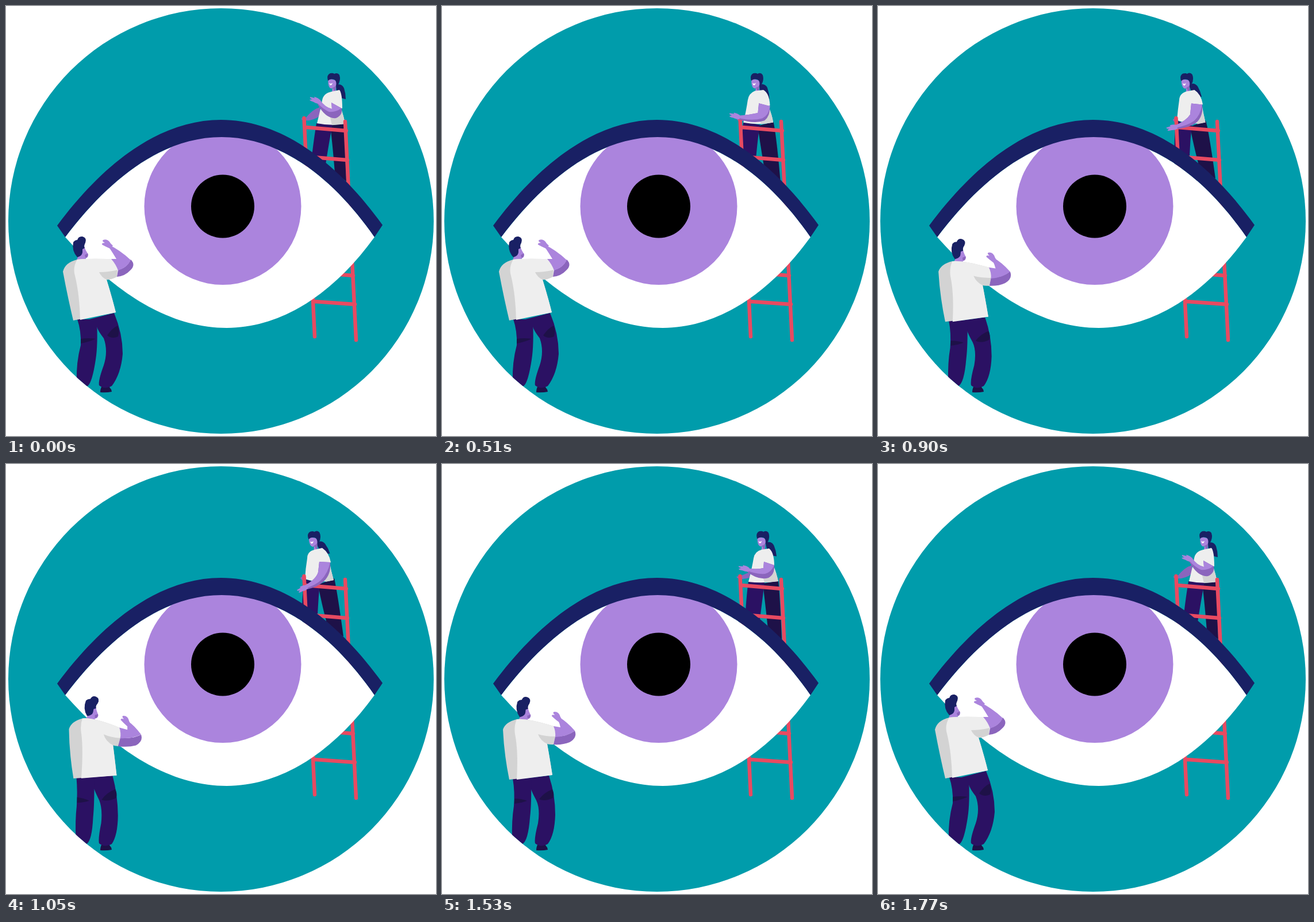
An HTML page that plays this animation: 748 by 748 pixels, repeating every 2.27 s.

```html
<!DOCTYPE html>
<html lang="en">
<head>
<meta charset="utf-8">
<title>Eye check</title>
<style>
  html, body { margin: 0; height: 100%; overflow: hidden; background: #fff; }
  svg { display: block; width: 100vw; height: 100vh; }
</style>
</head>
<body>
<svg viewBox="0 0 748 748">
  <clipPath id="disc"><circle cx="374" cy="374" r="370"/></clipPath>
  <circle cx="374" cy="374" r="370" fill="#009cab"/>

  <g id="womanBack"></g>
  <path d="M518.5 195L537 575M590 201L609 581M522 211L592 217M522 262L594 268M532 463L604 469M537 514L607 519"
    stroke="#e84a61" stroke-width="6.5" stroke-linecap="round"/>
  <g id="womanFront"></g>

  <path d="M103 402C180 300 272 228 375 228S570 300 641 402C570 500 480 560 384 560C285 560 190 500 103 402Z" fill="#fff"/>
  <circle cx="377" cy="348.5" r="136.5" fill="#ab84dd"/>
  <circle cx="377" cy="348.5" r="55"/>
  <path d="M89 382C172 270 270 198 374 198S575 270 655 381L641 402C570 300 478 228 375 228S180 300 103 402Z" fill="#192064"/>

  <g id="man" clip-path="url(#disc)"></g>
</svg>
<script>
const SKIN = '#ab84dd', SHADE = '#8b65bd', NAVY = '#192064', PANTS = '#2b1163', DARK = '#1e1148',
      SHIRT = '#eee', GREY = '#d3d3d3';
const STEP = 30, LOOP = 2270, LAST = 18;
const NUMBER = /-?\d+(\.\d+)?/g;
const movers = [];

// Each phase maps steps to poses as [step, pose] pairs.
const phaseStarts = [150, 690, 1230];
const womanPhases = [[[0, 0], [7, 1], [18, 2]], [[0, 2], [12, 3]], [[2, 4], [10, 5], [18, 0]]];
const manPhases = [[[0, 0]], [[0, 0], [8, 1], [16, 2]], [[2, 2], [10, 1], [18, 0]]];

function add(parent, tag, attrs) {
  const el = document.createElementNS('http://www.w3.org/2000/svg', tag);
  for (const name in attrs) el.setAttribute(name, attrs[name]);
  return parent.appendChild(el);
}

function track(el, attr, phases, poses) {
  movers.push({ el, attr, phases, template: poses[0], poses: poses.map(p => p.match(NUMBER).map(Number)) });
}

const morph = (layer, phases, fill, ...poses) => track(add(layer, 'path', { fill }), 'd', phases, poses);

function rigid(layer, phases, shapes, ...poses) {
  const group = add(layer, 'g');
  for (const [fill, d] of shapes) add(group, 'path', { fill, d });
  track(group, 'transform', phases, poses);
}

function buildWoman(back, front) {
  const part = (...args) => morph(back, womanPhases, ...args);
  const arm = (...args) => morph(front, womanPhases, ...args);

  // far arm
  part(SHADE,
    'M546 176Q533 180 522 194L513 196Q516 200 528 199Q542 196 546 190Z',
    'M533 188Q525 192 520 194L512 196Q514 200 522 200Q528 198 531 198Z',
    'M523 192Q520 193 518 194L514 197Q514 201 519 201Q522 200 523 200Z',
    'M521 195Q518 195 516 195L512 198Q513 202 517 202Q519 201 521 200Z',
    'M523 194Q519 194 516 194L511 197Q513 201 517 201Q520 200 523 199Z',
    'M536 188Q528 191 521 194L512 196Q514 201 524 200Q531 199 535 198Z');
  // legs
  part(DARK,
    'M564 208L588 204Q589 220 592 305L572 290Q568 240 564 208Z',
    'M555 208L582 203Q586 230 590 305L564 285Q559 240 555 208Z',
    'M543 210L569 200Q575 215 587 300L560 285Q547 235 543 210Z',
    'M543 210L571 199Q576 220 587 300L560 285Q547 235 543 210Z',
    'M546 210L573 201Q578 220 588 302L562 285Q550 235 546 210Z',
    'M558 208L585 203Q588 230 591 305L567 287Q562 240 558 208Z');
  part(PANTS,
    'M540 204L568 206Q564 225 556 275L532 262Q535 235 540 204Z',
    'M530 204L559 206Q555 230 550 268L526 255Q527 225 530 204Z',
    'M519 198L546 208Q542 235 542 265L516 248Q516 215 519 198Z',
    'M519 200L546 208Q543 235 542 265L515 248Q516 220 519 200Z',
    'M522 201L550 208Q546 235 546 266L520 250Q521 220 522 201Z',
    'M533 204L561 206Q558 230 553 270L528 257Q530 225 533 204Z');
  // ponytail and head
  rigid(back, womanPhases, [[NAVY, 'M574 137Q584 134 588 143Q591 152 591 162Q583 161 579 157Q574 148 574 137Z']],
    'translate(0 0) rotate(0 574 138)', 'translate(-13.5 0) rotate(0 574 138)',
    'translate(-31 0) rotate(-5 574 138)', 'translate(-34 0) rotate(-18 574 138)',
    'translate(-30.5 0) rotate(-17 574 138)', 'translate(-11 0) rotate(-5 574 138)');
  rigid(back, womanPhases, [
    [SKIN, 'M561 126Q559 136 563 142Q567 145 568 142L567 150L573 151L574 139Q578 136 576 130Z'],
    [SHADE, 'M568 142Q572 141 574 138L573 150L571 148Z'],
    [NAVY, 'M560 130Q557 120 564 117Q569 116 571 118Q577 115 580 120Q583 129 577 138L574 139Q576 131 571 128Q564 126 560 130Z'],
    ['#fff', 'M562 134Q565 136 568 134Q567 138 564 138Z']],
    'translate(0 0) rotate(0 570 145)', 'translate(-13.5 0) rotate(0 570 145)',
    'translate(-31 0) rotate(-1 570 145)', 'translate(-32 0) rotate(-6 570 145)',
    'translate(-29 0) rotate(-5 570 145)', 'translate(-11.5 0) rotate(-1 570 145)');
  // shirt
  part(SHIRT,
    'M566 149Q552 152 550 164Q547 180 541 204Q565 209 590 205Q587 190 583 178L585 178Q585 152 580 146Z',
    'M552 148Q541 152 539 164Q536 182 530 205Q556 208 582 203Q580 190 573 176L576 175Q576 152 567 146Z',
    'M537 148Q525 152 524 163Q522 180 520 197Q545 208 569 203Q567 190 564 172L565 171Q562 152 551 146Z',
    'M537 149Q524 152 524 164Q521 182 520 200Q545 208 570 202Q566 188 563 172L565 171Q562 154 550 146Z',
    'M541 149Q528 152 527 163Q524 182 522 201Q548 209 572 203Q568 190 566 173L568 172Q565 153 553 146Z',
    'M556 149Q544 152 542 164Q539 182 533 205Q558 208 585 204Q582 190 577 177L578 177Q578 154 569 147Z');
  part(GREY,
    'M563 190L567 207L590 205Q588 193 584 184Z',
    'M555 195L558 206L582 203Q580 190 575 182Z',
    'M552 195L555 206L569 203Q567 190 564 180Z',
    'M553 195L556 205L570 202Q567 190 564 180Z',
    'M555 195L558 206L572 203Q569 190 566 180Z',
    'M558 195L561 206L585 204Q582 190 577 182Z');
  // near arm
  arm(SHADE,
    'M566 168L584 178Q586 190 574 195Q556 197 541 169L546 163Q554 176 567 179Z',
    'M557 169L576 176Q576 192 566 198Q548 202 523 186L524 180Q540 183 556 183Z',
    'M545 169L564 172Q567 190 556 200Q540 210 511 208L511 203Q532 199 543 190Z',
    'M545 170L564 171Q566 192 552 205Q542 214 523 218L519 212Q540 200 543 188Z',
    'M548 170L568 172Q568 192 554 203Q543 212 525 216L521 210Q542 200 546 188Z',
    'M560 170L578 176Q579 192 568 198Q550 203 530 187L531 181Q545 184 559 181Z');
  arm(SKIN,
    'M566 168L583 178Q574 185 562 184Q552 180 541 168L546 163Q554 176 567 179Z',
    'M557 169L576 176Q572 189 560 192Q542 194 523 184L524 180Q540 183 556 183Z',
    'M545 169L564 172Q562 190 552 197Q538 204 511 206L511 203Q532 199 543 190Z',
    'M545 170L564 171Q560 190 548 202Q538 211 522 216L519 212Q540 200 543 188Z',
    'M548 170L567 172Q563 190 550 200Q540 208 524 214L521 210Q542 200 546 188Z',
    'M560 170L578 176Q572 189 562 191Q546 192 530 185L531 181Q545 184 559 181Z');
  rigid(front, womanPhases, [[SKIN, 'M2 -3Q-3 -6 -8 -6Q-11 -6 -8 -4L-16 -4Q-18 -2 -12 -1L-16 1Q-15 3 -9 3Q-4 5 2 4Z']],
    'translate(544 166) rotate(14)', 'translate(524 182) rotate(12)', 'translate(513 205) rotate(0)',
    'translate(522 214) rotate(-32)', 'translate(523 211) rotate(-28)', 'translate(532 183) rotate(5)');
}

function buildMan(layer) {
  const part = (...args) => morph(layer, manPhases, ...args);

  add(layer, 'path', { fill: DARK, d: 'M164 672Q164 663 169 659L179 660Q180 664 183 667L184 671Q174 673 164 672Z' });
  // legs and folds
  part(PANTS,
    'M145 545L188 534Q203 570 203 605Q200 640 184 661Q172 668 162 660Q160 652 170 625Q178 600 170 578Q160 565 158 558L150 560Z',
    'M143 547L186 542Q197 575 197 610Q196 645 184 661Q172 668 162 660Q160 652 167 625Q171 600 164 585Q157 572 155 566L148 565Z',
    'M140 540L185 539Q192 575 193 612Q193 645 184 661Q172 668 162 660Q160 652 164 625Q166 600 161 582Q154 568 152 562L146 560Z');
  part(PANTS,
    'M124 545Q131 565 130 590Q122 620 123 652Q128 665 142 661Q150 655 156 615Q160 590 158 545Z',
    'M123 547Q127 570 125 595Q121 620 122 652Q128 665 140 661Q150 655 153 615Q156 590 155 547Z',
    'M122 540Q122 570 121 595Q119 620 121 652Q128 665 141 661Q149 655 150 615Q152 590 152 540Z');
  part(DARK,
    'M130 579Q143 577 156 579Q142 585 130 587Z',
    'M126 582Q138 582 148 586Q137 590 126 591Z',
    'M121 575Q133 578 143 583Q133 586 121 585Z');
  part(DARK,
    'M176 573Q184 561 194 556Q198 566 195 575Q184 580 176 573Z',
    'M169 583Q178 571 192 566Q196 574 193 581Q178 588 169 583Z',
    'M164 582Q172 569 188 562Q191 571 190 579Q175 586 164 582Z');
  // head
  rigid(layer, manPhases, [
    [SKIN, 'M136 419Q139 426 143 432Q143 438 138 439L141 443L122 444Q126 436 125 430Z'],
    [SHADE, 'M137 433Q140 432 142 430Q144 437 138 438Z'],
    [NAVY, 'M124 437Q114 426 117 411Q120 407 124 407Q126 400 133 401Q141 403 138 412Q135 417 137 421L133 423L133 428Q133 433 127 436Z']],
    'translate(0 0) rotate(0 131 437)', 'translate(11 4) rotate(7 131 437)', 'translate(23 -1) rotate(15 131 437)');
  // shirt
  part(GREY,
    'M124 441Q135 439 184 440Q191 449 194 459L193 471Q182 477 175 476Q184 505 191 533L117 547Q107 505 99 462Q103 446 124 441Z',
    'M130 444Q148 442 194 456Q198 465 197 474L194 488Q186 488 183 487Q188 515 192 541L117 549Q108 505 106 462Q110 449 130 444Z',
    'M136 439Q155 437 199 457Q202 467 201 476L196 490Q192 490 189 489Q191 515 193 540L118 543Q113 500 113 460Q116 445 136 439Z');
  part(SHIRT,
    'M124 441Q135 439 184 440Q191 449 195 459Q178 463 162 463Q166 472 175 476Q184 505 191 533L129 546Q128 500 119 465Q117 452 124 441Z',
    'M130 444Q148 442 194 456Q198 465 197 474Q180 474 167 470Q171 481 183 487Q188 515 192 541L130 549Q133 500 127 470Q125 456 130 444Z',
    'M136 439Q155 437 199 457Q202 467 200 476Q184 474 173 468Q175 482 189 489Q191 515 193 540L132 542Q136 495 135 465Q132 450 136 439Z');
  // arm and hand
  part(SHADE,
    'M217 441Q226 450 217 459Q207 470 193 471L195 459Q210 456 217 441Z',
    'M231 464Q236 476 222 484Q210 489 194 488L197 474Q218 474 231 464Z',
    'M237 474Q241 484 231 490Q215 494 196 490L201 476Q224 479 237 474Z');
  part(SKIN,
    'M183 440L192 440Q186 430 180 421L176 414Q198 424 217 442Q211 455 195 460Q191 449 183 440Z',
    'M194 456L206 458Q205 452 202 446L203 440Q217 448 231 464Q218 474 197 475Q198 465 194 456Z',
    'M199 457L215 463Q217 459 216 455L220 452Q229 460 237 474Q224 478 201 476Q202 467 199 457Z');
  rigid(layer, manPhases, [[SKIN, 'M-1 5Q-10 1 -15 -2Q-16 -5 -10 -5Q-16 -8 -13 -10Q-5 -13 0 -4L4 0Z']],
    'translate(182 417) rotate(0)', 'translate(205 444) rotate(14)', 'translate(219 455) rotate(20)');
}

// Lagrange weights of the given keys at one step.
const weightsAt = (keys, step) => keys.map(([at, pose]) => [pose,
  keys.reduce((w, [other]) => other === at ? w : w * (step - other) / (at - other), 1)]);

function draw() {
  const time = (performance.now() - start) % LOOP;
  const phase = time < 720 ? 0 : time < 1260 ? 1 : 2;
  const step = Math.max(0, Math.min(LAST, Math.floor((time - phaseStarts[phase]) / STEP)));
  for (const { el, attr, phases, template, poses } of movers) {
    const weights = weightsAt(phases[phase], step);
    let i = 0;
    el.setAttribute(attr, template.replace(NUMBER, () => {
      const value = weights.reduce((sum, [pose, w]) => sum + w * poses[pose][i], 0);
      i++;
      return value.toFixed(2);
    }));
  }
  requestAnimationFrame(draw);
}

const layer = id => document.getElementById(id);
buildWoman(layer('womanBack'), layer('womanFront'));
buildMan(layer('man'));
const start = performance.now();
draw();
</script>
</body>
</html>
```
